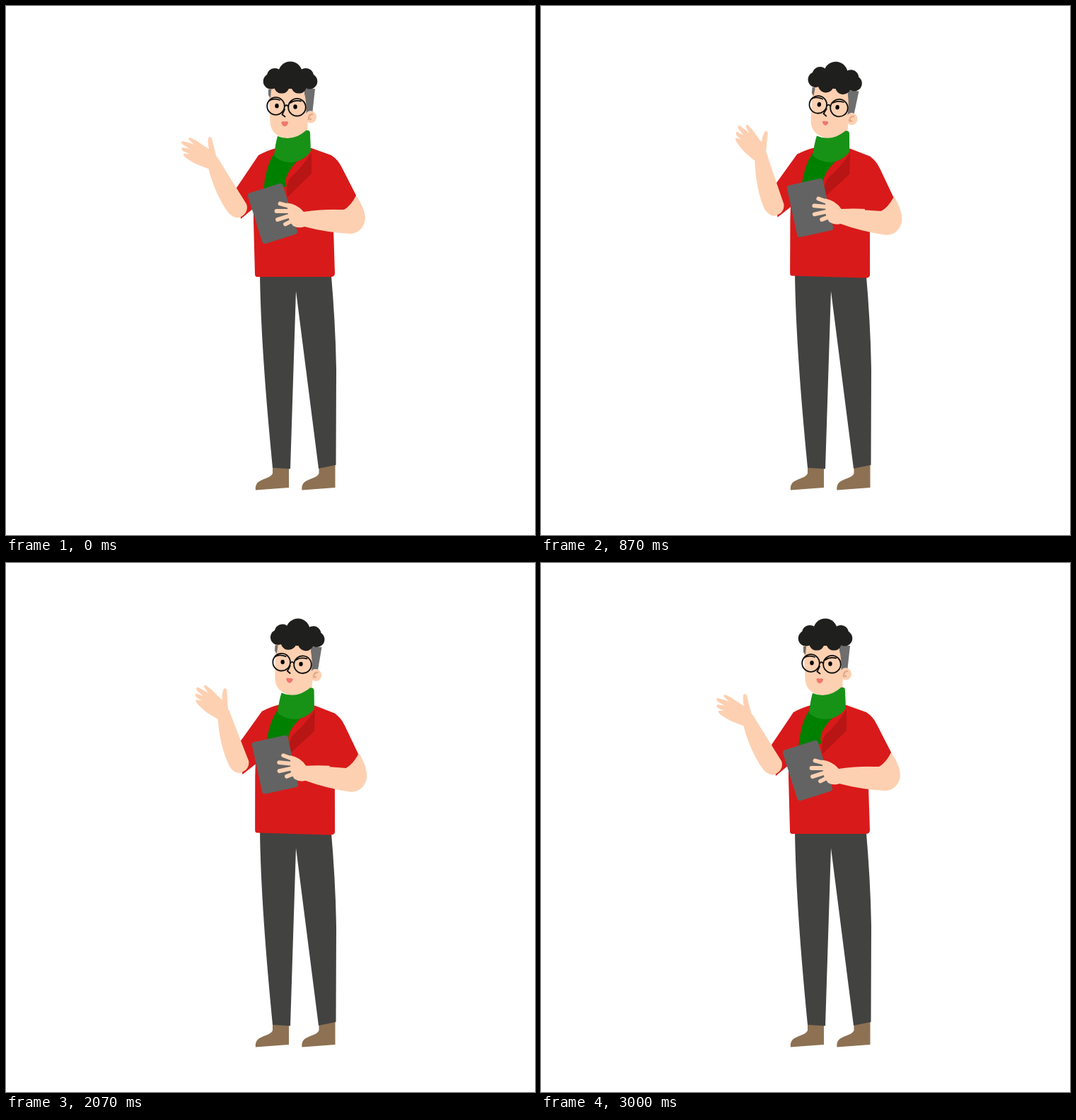
An HTML page for the animation above (3030 ms loop, 748 by 748 pixels).

```html
<!DOCTYPE html>
<html>
<head>
<meta charset="utf-8">
<style>
html, body { margin: 0; height: 100%; overflow: hidden; background: #fff; }
svg { display: block; width: 100vw; height: 100vh; }
.skin { fill: #fdd0b1; }
.red { fill: #d91a1a; }
.grey { fill: #6e6e6e; }
.hair { fill: #1f1f1d; }
.line { fill: none; stroke: #0d0d0d; stroke-width: 1.8; stroke-linecap: round; }
.fingers { fill: none; stroke: #fdd0b1; stroke-width: 5.8; stroke-linecap: round; }
</style>
</head>
<body>
<svg viewBox="0 0 748 748">
  <g fill="#8d7152">
    <path id="shoe" d="M377 646H400V681L353 684.500C351 667 372 671 377 661Z"/>
    <use href="#shoe" x="65.500"/>
  </g>
  <path fill="#424240" d="M359 376H459.500Q466 450 467 515L466.500 649L442 654L410 403L402 654.500L377 653Q360 480 359 376Z"/>

  <g id="torso">
    <path class="red" d="M357 211Q370 204 382 201H432L460 211Q470 218 474 227L495 268Q488 282 478 288L463 315L465 378Q465 383 459 383H355Q352 383 352 379L350 303V286L332 301L326 257Z"/>

    <g id="head">
      <path class="skin" d="M371 116H428L426 190H410Q398 189 386 184Q374 178 373.500 163Z"/>
      <path class="grey" d="M371 118H375L374 130L371 126ZM422 117H437L433.500 149Q427 147 424.500 152Q425 135 422 124Z"/>
      <ellipse class="skin" cx="431" cy="157" rx="8" ry="8.500"/>
      <path fill="none" stroke="#e2ac8c" stroke-width="2.500" stroke-linecap="round" d="M433 153Q428 153 428 160L431 160"/>
      <g id="curls" class="hair"><ellipse cx="402" cy="104" rx="30" ry="13"/></g>
      <g class="line">
        <circle cx="381.500" cy="141.500" r="12.300"/>
        <circle cx="411.500" cy="143.200" r="12.300"/>
        <path d="M394 142Q396.500 138.500 399 142M372 134Q378 130 387 133M402 137Q408 132.500 417 134.500M394 146L390.500 153.500L394.500 156.500"/>
      </g>
      <ellipse cx="383" cy="141.200" rx="2.700" ry="3.200"/>
      <ellipse cx="409" cy="142.500" rx="2.700" ry="3.200"/>
      <path id="mouth" fill="#f0786c" d="M-5 -2.500Q-2 -4.500 0 -3Q3 -4.500 5.500 -2Q4 4 0 4Q-4 3 -5 -2.500Z"/>
    </g>

    <path fill="#008000" d="M379 209Q367 226 364 262L397 255Q390 242 412 219Z"/>
    <path fill="#179217" d="M384 184Q398 190 412 184Q420 180 424 176Q430 175 430 180L431 205Q422 219 404 221Q388 221 379 212Q381 194 384 184Z"/>
    <path fill="#b81515" d="M432 207V237L398 270Q395 252 402 243Q418 229 432 207Z"/>

    <g id="rightArm">
      <rect fill="#636363" x="-26" y="-37.500" width="52" height="75" rx="4" transform="translate(377 293.500) rotate(-17.500)"/>
      <path class="fingers" d="M387.500 279.500L408 285M382.500 290L405 290M384 302L406 295M395 308.500L410 301"/>
      <path class="skin" d="M397 278.500Q412 280 421 291Q450 287 474 288L484 262L495 268Q510 290 507.500 304Q503 321 487 322Q452 320 422 312Q414 315 406 311Q398 302 399 292Z"/>
    </g>
    <path class="red" d="M470 222L474 227L495 268Q488 282 478 288L455 287V230Z"/>

    <g id="leftArm">
      <path class="skin" d="M285 226Q296 268 315 293Q323 301 331 299Q344 292 340 280Q318 245 299 214Z"/>
      <path id="leftHand" class="skin" d="M299 217Q295 205 291 187Q288 183 286 187Q285 195 287 202Q283 200 276 195Q268 189 260 186Q257 187 259 189.500L266 196Q258 193 250 191Q246 192 250 196L260 202L250 200Q247 202 250 205L259 209L252 208.500Q249 210 253 213.500Q264 222 275 226L286 230Z"/>
    </g>
  </g>
</svg>
<script>
const LOOP = 3030, CURLS = 7;
const part = id => document.getElementById(id);

// Curls sit evenly on a flat ring, the top one larger.
for (let i = 0; i < CURLS; i++) {
  const a = 2 * Math.PI * i / CURLS - Math.PI / 2;
  const curl = document.createElementNS("http://www.w3.org/2000/svg", "circle");
  curl.setAttribute("cx", 402 + 28 * Math.cos(a));
  curl.setAttribute("cy", 104.5 + 9 * Math.sin(a));
  curl.setAttribute("r", i ? 11 : 17);
  part("curls").append(curl);
}

function ease(t, from, to) {
  const x = Math.min(1, Math.max(0, (t - from) / (to - from)));
  return (1 - Math.cos(Math.PI * x)) / 2;
}

// Rises to 1, holds, and falls back to 0.
const pulse = (t, start, high, fall, end) => ease(t, start, high) - ease(t, fall, end);

function turn(id, angle, x, y) {
  part(id).setAttribute("transform", `rotate(${angle} ${x} ${y})`);
}

function draw(now) {
  const t = now % LOOP;
  const firstWave = pulse(t, 0, 620, 950, 1480);
  const secondWave = pulse(t, 1480, 2000, 2300, 3000);

  turn("torso", 1.7 * pulse(t, 0, 600, 1900, 3000), 408, 383);
  turn("head", 4 * pulse(t, 0, 820, 1650, 2440), 404, 185);
  turn("leftArm", 11.5 * firstWave + 9.1 * secondWave, 329, 283);
  turn("leftHand", 6.8 * firstWave, 292, 221);
  turn("rightArm", 4.5 * pulse(t, 0, 450, 600, 1480) + 3.7 * pulse(t, 1600, 2000, 2150, 3000), 495, 300);

  const open = 0.45 + 0.5 * Math.abs(Math.cos(3 * Math.PI * t / LOOP)) ** 3;
  part("mouth").setAttribute("transform", `translate(394 166.500) scale(${open})`);
  requestAnimationFrame(draw);
}
draw(0);
</script>
</body>
</html>
```
